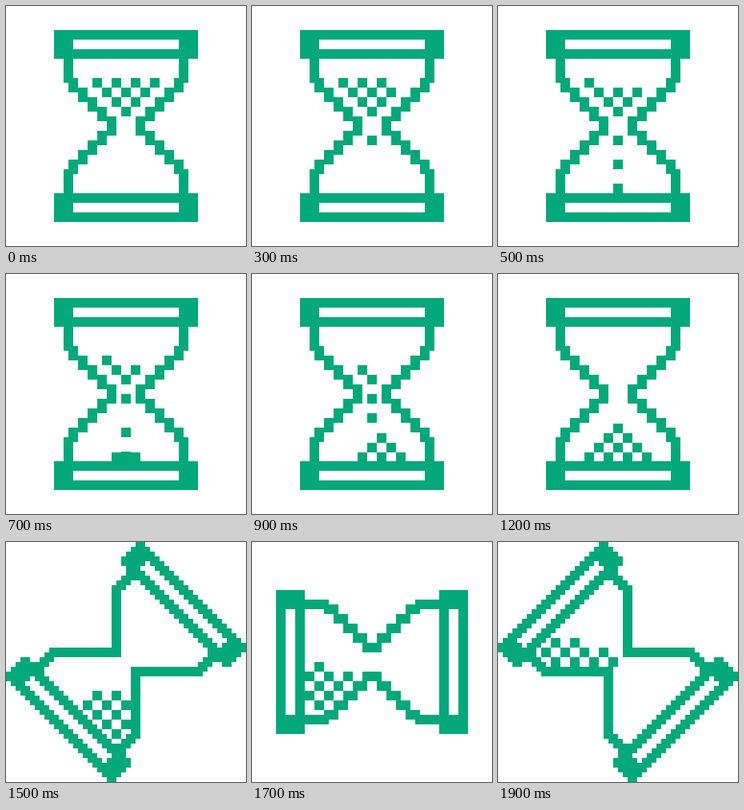
An HTML page with a canvas that plays this animation: 300 px wide and 300 px high, repeating every 2.1 s.

```html
<!DOCTYPE html>
<html lang="en">
<head>
<meta charset="utf-8">
<title>Hourglass</title>
<style>
  html, body { margin: 0; width: 100%; height: 100%; overflow: hidden; background: #fff; }
  canvas { display: block; width: 300px; height: 300px; image-rendering: pixelated; }
</style>
</head>
<body>
<canvas id="stage" width="300" height="300"></canvas>
<script>
const ctx = document.getElementById('stage').getContext('2d');
const SIZE = 300, CELL = 6, GRAIN = 12, ROWS = 4, NECK_X = 144, LOOP = 2100;

const drawGrain = (x, y) => ctx.fillRect(x, y, GRAIN, GRAIN);

function transformed(matrix, draw) {
  ctx.save();
  ctx.translate(SIZE / 2, SIZE / 2);
  ctx.transform(...matrix, 0, 0);
  ctx.translate(-SIZE / 2, -SIZE / 2);
  draw();
  ctx.restore();
}

// A triangle of grains, widest row first; side is 1 for growing up, -1 for down.
function triangle(y, side) {
  const grains = [];
  for (let row = 0; row < ROWS; row++)
    for (let col = 0; col < ROWS - row; col++)
      grains.push({ row, col, x: 108 + GRAIN * (row + 2 * col), y: y - side * GRAIN * row });
  return grains;
}

// The upper sand empties row by row from the right; the heap gets its left slope last.
const supply = triangle(90, -1).sort((a, b) => a.row - b.row || b.col - a.col);
const heap = triangle(223, 1).sort((a, b) => !a.col - !b.col);

function drawSand(time) {
  const step = Math.floor(time / 100) - 2;
  supply.forEach((grain, i) => {
    const age = step - Math.round(0.8 * i + 1.2);
    // Later grains fall a shorter way, onto the grown heap.
    const [drop, duration] = i < 5 ? [30, 3] : [24, 2];
    if (age < 0) drawGrain(grain.x, grain.y);
    else if (age < duration) drawGrain(NECK_X, 102 + drop * (2 + age));
    else drawGrain(heap[i].x, heap[i].y);
  });
}

// Sand in the turning glass: every other square of a grid, where keep allows it.
function checkered(left, top, cols, rows, keep) {
  for (let row = 0; row < rows; row++)
    for (let col = 0; col < cols; col++)
      if ((row + col) % 2 && keep(col, row)) drawGrain(left + GRAIN * col, top + GRAIN * row);
}

function straightQuarter() {
  ctx.fillRect(60, 30, 24, 36);
  ctx.fillRect(84, 30, 66, 12);
  ctx.fillRect(84, 54, 66, 12);
  ctx.fillRect(72, 66, 12, 30);
  for (let i = 0; i < 4; i++) ctx.fillRect(78 + 12 * i, 90 + 12 * i, 12, 18);
  ctx.fillRect(126, 138, 12, 12);
}

function straightGlass() {
  for (const sx of [1, -1])
    for (const sy of [1, -1]) transformed([sx, 0, 0, sy], straightQuarter);
}

function diagonalWall() {
  for (let i = 0; i < 4; i++) ctx.fillRect(150 - CELL * i, 36 + CELL * i, 18, CELL);
  ctx.fillRect(132, 54, 12, 90);
}

function diagonalGlass() {
  for (let x = 0; x < SIZE; x += CELL) {
    for (let y = 0; y < SIZE; y += CELL) {
      const dx = x + CELL / 2 - SIZE / 2, dy = y + CELL / 2 - SIZE / 2;
      const along = Math.abs(dx + dy) * Math.SQRT1_2;
      const out = Math.abs(dy - dx) * Math.SQRT1_2;
      const cap = along < 94 && out > 84 && out < 120;
      const slot = along < 68 && out > 96 && out < 108;
      if (cap && !slot) ctx.fillRect(x, y, CELL, CELL);
    }
  }
  for (const s of [1, -1]) {
    transformed([s, 0, 0, s], diagonalWall);
    transformed([0, s, s, 0], diagonalWall);
  }
}

function render(now) {
  const time = now % LOOP;
  ctx.fillStyle = '#fff';
  ctx.fillRect(0, 0, SIZE, SIZE);
  ctx.fillStyle = '#05a87a';
  if (time < 1500) {
    straightGlass();
    drawSand(time);
  } else if (time < 1700) {
    diagonalGlass();
    checkered(96, 186, 5, 5, (col, row) => col >= row - 1);
  } else if (time < 1900) {
    transformed([0, 1, -1, 0], straightGlass);
    checkered(66, 150, 5, 5, (col, row) => col < 2 + 3 * row);
  } else {
    transformed([-1, 0, 0, 1], diagonalGlass);
    checkered(54, 120, 8, 3, (col, row) => col < 4 + 4 * row);
  }
}

const start = performance.now();
function tick() {
  render(performance.now() - start);
  requestAnimationFrame(tick);
}
tick();
</script>
</body>
</html>
```
